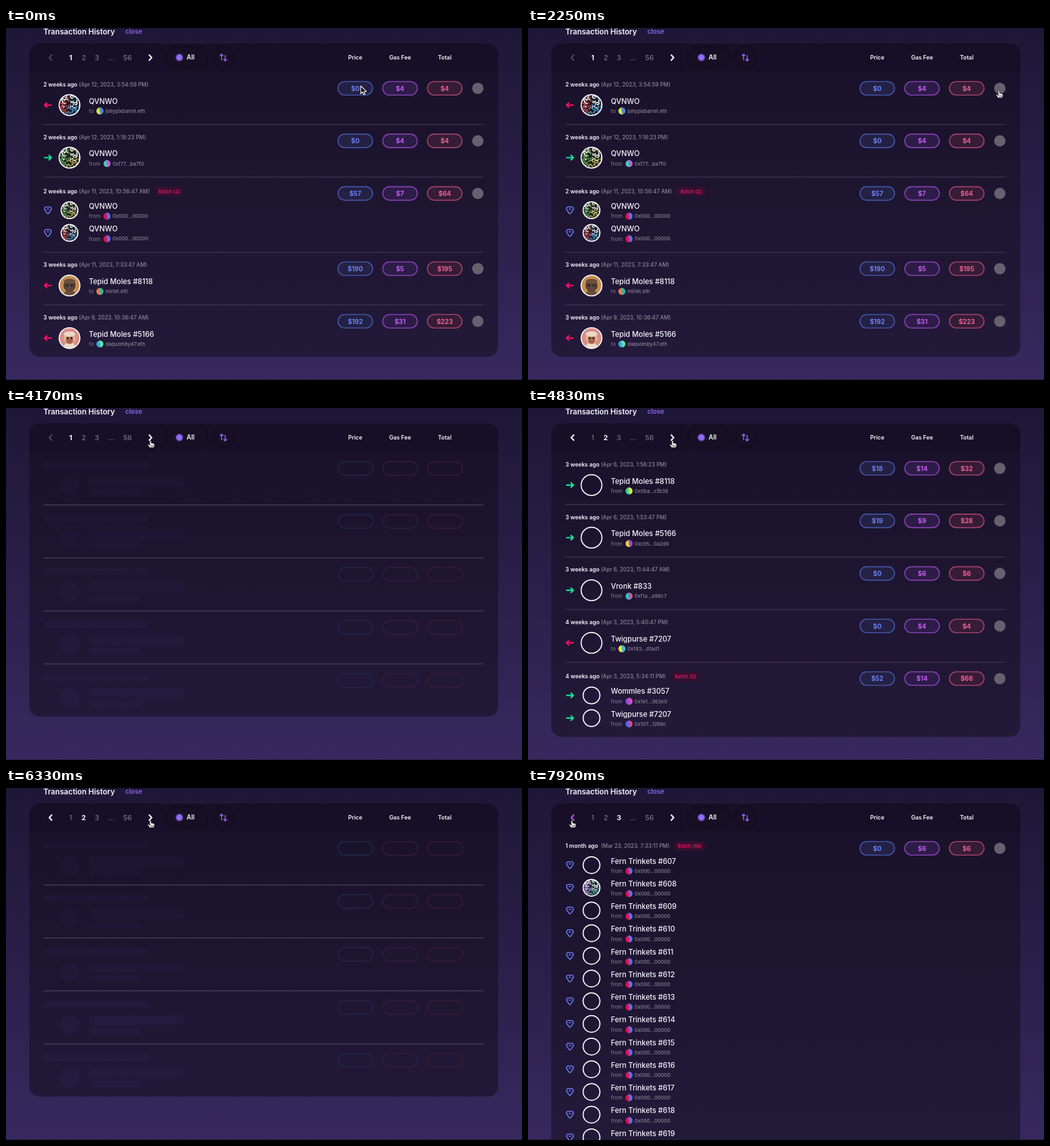
Write an HTML page with a canvas that moves like this. It is 800 by 547 pixels and loops after 8000 ms.

```html
<!DOCTYPE html>
<html lang="en">
<head>
<meta charset="utf-8">
<title>Transaction History</title>
<style>
html, body { margin: 0; width: 100%; height: 100%; overflow: hidden; background: #1f1738; }
canvas { display: block; width: 800px; height: 547px; }
</style>
</head>
<body>
<canvas id="stage" width="800" height="547"></canvas>
<script>
const ctx = document.getElementById('stage').getContext('2d');
const LOOP = 8000, FPS = 12, ROW = 81.7, ITEM = 35.25, FIRST = 93.7;
const WHITE = '#f6f4fc', GREY = '#8a8499', PURPLE = '#c153ea';
const COLUMNS = [
  { x: 541.5, label: 'Price', text: '#6c82f3', line: '#4354a4', fill: '#242144', ghost: '#23254a' },
  { x: 610.9, label: 'Gas Fee', text: '#c25ef3', line: '#8441b0', fill: '#2e1c48', ghost: '#321d40' },
  { x: 680.2, label: 'Total', text: '#f45f8e', line: '#9f4269', fill: '#361c37', ghost: '#3b1a35' }
];

// item: [direction, name, wallet, wallet colours, artwork, artwork load time]
const NONE = '0x000...00000', ZERO = ['#e3114f', '#5573f2'];
const PAGES = [
  [
    row('2 weeks ago', 'Apr 12, 2023, 3:54:59 PM', [0, 4, 4], [['out', 'QVNWO', 'jollypixbarrel.eth', ['#d4e34e', '#4a86d8'], 'red', 0]]),
    row('2 weeks ago', 'Apr 12, 2023, 1:18:23 PM', [0, 4, 4], [['in', 'QVNWO', '0xf77...ba7f0', ['#46c9b4', '#c659e0'], 'green', 0]]),
    row('2 weeks ago', 'Apr 11, 2023, 10:56:47 AM', [57, 7, 64], [
      ['mint', 'QVNWO', NONE, ZERO, 'green', 0],
      ['mint', 'QVNWO', NONE, ZERO, 'red', 0]], 230),
    row('3 weeks ago', 'Apr 11, 2023, 7:33:47 AM', [190, 5, 195], [['out', 'Tepid Moles #8118', 'mirlet.eth', ['#ef7847', '#2fb6a2'], 'brown', 0]]),
    row('3 weeks ago', 'Apr 9, 2023, 10:36:47 AM', [192, 31, 223], [['out', 'Tepid Moles #5166', 'daquomby47.eth', ['#32a9e8', '#5fe0a4'], 'pink', 0]])
  ],
  [
    row('3 weeks ago', 'Apr 6, 2023, 1:56:23 PM', [18, 14, 32], [['in', 'Tepid Moles #8118', '0x0ba...cfb38', ['#34d68c', '#e8e43c'], 'brown', 5050]]),
    row('3 weeks ago', 'Apr 6, 2023, 1:53:47 PM', [19, 9, 28], [['in', 'Tepid Moles #5166', '0xcb5...0a2d9', ['#edcf4a', '#9a46d8'], 'pink', 5050]]),
    row('3 weeks ago', 'Apr 6, 2023, 11:44:47 AM', [0, 6, 6], [['in', 'Vronk #833', '0xf1a...e96c7', ['#2bc2c5', '#d4568c']]]),
    row('4 weeks ago', 'Apr 3, 2023, 5:40:47 PM', [0, 4, 4], [['out', 'Twigpurse #7207', '0x183...d1ad1', ['#eee13e', '#35bde0']]]),
    row('4 weeks ago', 'Apr 3, 2023, 5:34:11 PM', [52, 14, 66], [
      ['in', 'Wommles #3057', '0x1e1...363e0', ['#8c4be8', '#dd4fb6']],
      ['in', 'Twigpurse #7207', '0x107...126bc', ['#4d6af0', '#e0447a']]], 221)
  ],
  [
    row('1 month ago', 'Mar 23, 2023, 7:33:11 PM', [0, 6, 6], Array.from({ length: 18 }, (_, i) =>
      ['mint', 'Fern Trinkets #' + (607 + i), NONE, ZERO, i === 1 ? 'violet' : null, 7740]), 226)
  ]
];

function row(age, date, prices, items, badgeX) {
  return { age, date, prices, items, badgeX };
}

function text(str, x, y, size, color, weight = 500, align = 'left') {
  ctx.font = `${weight} ${size}px Inter, sans-serif`;
  ctx.fillStyle = color;
  ctx.textAlign = align;
  ctx.fillText(str, x, y + size * 0.364);
}

function box(x, y, w, h, r, fill, stroke, width = 1.5) {
  ctx.beginPath();
  ctx.roundRect(x, y, w, h, r);
  if (fill) { ctx.fillStyle = fill; ctx.fill(); }
  if (stroke) { ctx.strokeStyle = stroke; ctx.lineWidth = width; ctx.stroke(); }
}

function disc(x, y, r, fill, stroke, width) {
  box(x - r, y - r, r * 2, r * 2, r, fill, stroke, width);
}

function lines(color, width, ...paths) {
  ctx.strokeStyle = color;
  ctx.lineWidth = width;
  ctx.lineCap = ctx.lineJoin = 'round';
  ctx.beginPath();
  for (const path of paths) path.forEach(([x, y], i) => i ? ctx.lineTo(x, y) : ctx.moveTo(x, y));
  ctx.stroke();
}

function gradient(y0, y1, ...colors) {
  const g = ctx.createLinearGradient(0, y0, 0, y1);
  colors.forEach((c, i) => g.addColorStop(i / (colors.length - 1), c));
  return g;
}

function random(seed) {
  return () => (seed = seed * 16807 % 2147483647) / 2147483647;
}

// Dabs on a sunflower spiral: mostly white above, coloured below.
function splatter(r, a, b) {
  const rnd = random(48271 * 7), count = 90;
  for (let i = 0; i < count; i++) {
    const d = r * Math.sqrt((i + 0.5) / count), turn = i * 2.39996;
    const x = d * Math.cos(turn), y = d * Math.sin(turn);
    const pick = rnd();
    if (pick < 0.3) continue;
    const white = pick < (y < 0 ? 0.78 : 0.45);
    ctx.fillStyle = white ? '#e9e8e2' : x + y * 0.4 < 0 ? a : b;
    ctx.beginPath();
    ctx.ellipse(x, y, r * (0.08 + rnd() * 0.08), r * 0.065, rnd() * 6, 0, 7);
    ctx.fill();
  }
}

function portrait(r, head, face, hat) {
  disc(0, r, r * 0.6, hat);
  disc(0, 0, r * 0.58, head);
  disc(0, r * 0.22, r * 0.34, face);
  ctx.beginPath();
  ctx.ellipse(0, -r * 0.4, r * 0.56, r * 0.24, 0, 0, 7);
  ctx.fillStyle = hat;
  ctx.fill();
  disc(-r * 0.2, 0, r * 0.11, '#2b2426');
  disc(r * 0.2, 0, r * 0.11, '#2b2426');
}

const ART = {
  red: ['#161a26', r => splatter(r, '#c9404c', '#4b93c4')],
  green: ['#182019', r => splatter(r, '#5a9a52', '#b9a858')],
  violet: ['#232a38', r => splatter(r, '#b585d8', '#54a8a0')],
  brown: ['#c58d52', r => portrait(r, '#4d3d34', '#5f493b', '#6b503c')],
  pink: ['#d98f88', r => portrait(r, '#dcb592', '#a9624c', '#ecd9c6')]
};

function avatar(x, y, r, kind) {
  if (kind) {
    const [back, paint] = ART[kind];
    ctx.save();
    ctx.translate(x, y);
    disc(0, 0, r, back);
    ctx.clip();
    paint(r);
    ctx.restore();
  }
  disc(x, y, r, null, '#fbfafd', 1.7);
}

function direction(kind, x, y) {
  if (kind === 'mint') {
    ctx.beginPath();
    ctx.moveTo(x - 4, y - 4.8);
    ctx.quadraticCurveTo(x, y - 6, x + 4, y - 4.8);
    ctx.quadraticCurveTo(x + 6.4, y - 3, x + 4.8, y - 0.5);
    ctx.lineTo(x + 1, y + 5);
    ctx.quadraticCurveTo(x, y + 6, x - 1, y + 5);
    ctx.lineTo(x - 4.8, y - 0.5);
    ctx.quadraticCurveTo(x - 6.4, y - 3, x - 4, y - 4.8);
    ctx.strokeStyle = '#6a7af2';
    ctx.lineWidth = 1.5;
    ctx.stroke();
    lines('#6a7af2', 1.5, [[x - 1.3, y - 1.8], [x + 1.3, y - 1.8]]);
    return;
  }
  const s = kind === 'in' ? 1 : -1;
  lines(s > 0 ? '#12e59c' : '#f50f62', 2.2,
    [[x - 5 * s, y], [x + 5 * s, y]],
    [[x + 1.8 * s, y - 3.4], [x + 5.3 * s, y], [x + 1.8 * s, y + 3.4]]);
}

function wallet(kind, address, [left, right], y) {
  const out = kind === 'out', x = out ? 145.5 : 156.6;
  text(out ? 'to' : 'from', 128.5, y, 8, '#777086');
  disc(x, y, 5.4, left);
  ctx.beginPath();
  ctx.arc(x, y, 5.4, -1.75, 1.4);
  ctx.fillStyle = right;
  ctx.fill();
  text(address, out ? 154.2 : 165.2, y, 7.7, '#8b8598');
}

function divider(y, color) {
  ctx.fillStyle = color;
  ctx.fillRect(58, y - 0.8, 682, 1.6);
}

function drawRows(rows, time) {
  let y = FIRST;
  rows.forEach((r, n) => {
    const batch = r.items.length > 1;
    const dateY = y - (batch ? 3.6 : 5.8);
    text(r.age, 58, dateY, 8.7, WHITE, 600);
    text(`(${r.date})`, 113, dateY, 8.35, GREY);
    if (batch) {
      const label = `Batch (${r.items.length})`, w = r.items.length > 9 ? 49 : 46;
      box(r.badgeX, y - 10.8, w, 15.2, 7.6, '#35102f');
      text(label, r.badgeX + w / 2, y - 3.2, 7.5, '#d8125a', 700, 'center');
    }
    COLUMNS.forEach((c, i) => {
      box(c.x - 26.8, y - 10.5, 53.6, 21, 10.5, c.fill, c.line, 1.6);
      text('$' + r.prices[i], c.x, y + 0.3, 9.8, c.text, 700, 'center');
    });
    disc(731.5, y, 8.8, '#67616f');
    r.items.forEach(([kind, name, address, colors, art, loadAt], i) => {
      const mid = y + 26.1 + i * ITEM;
      direction(kind, 65, mid);
      avatar(98.5, mid, batch ? 13 : 16.1, art && time >= loadAt ? art : null);
      text(name, 128.5, mid - 6.2, 11.25, WHITE);
      wallet(kind, address, colors, mid + 9.2);
    });
    y += ROW + (r.items.length - 1) * ITEM;
    if (n < rows.length - 1) divider(y - 25.5, '#382f4d');
  });
}

function drawSkeleton(alpha) {
  for (let i = 0; i < 5; i++) {
    const y = 94 + i * 82.3;
    const tone = `rgba(62,54,122,${(0.07 + i * 0.012) * alpha})`;
    box(58, y - 10, 163, 11, 5, tone);
    disc(98.5, y + 27, 15.5, tone);
    box(128.5, y + 12, 148, 16, 6, tone);
    box(128.5, y + 31, 82, 11, 5, tone);
    ctx.globalAlpha = alpha;
    for (const c of COLUMNS) box(c.x - 26.5, y - 10.5, 54, 21, 10.5, null, c.ghost);
    ctx.globalAlpha = 1;
    if (i < 4) divider(y + 56.7, '#423952');
  }
}

function chevron(x, side, color) {
  lines(color, 2.2, [[x - 1.9 * side, 42], [x + 1.9 * side, 46], [x - 1.9 * side, 50]]);
}

function drawHeader(page, prevColor, nextColor) {
  text('Transaction History', 58, 5.8, 11.7, WHITE, 600);
  text('close', 185, 5.8, 10.1, '#8a68f2', 600);
  ctx.save();
  ctx.shadowColor = 'rgba(8,4,18,.55)';
  ctx.shadowBlur = 9;
  box(250, 31, 62, 29, 14.5, '#171025');
  disc(337, 45.8, 14.5, '#171025');
  ctx.restore();
  chevron(69, -1, prevColor);
  chevron(224, 1, nextColor);
  [['1', 100.3], ['2', 120.5], ['3', 141], ['...', 163], ['56', 188.5]].forEach(([s, x], i) => {
    const on = i === page;
    text(s, x, 46, 10.9, on ? WHITE : '#777083', on ? 700 : 500, 'center');
  });
  disc(268.8, 45.8, 5.2, '#9269f7', '#5b419f', 1.4);
  text('All', 280, 45.8, 9.8, WHITE, 600);
  lines('#6e75f2', 1.5, [[334.3, 49.5], [334.3, 40.8]], [[332, 43], [334.3, 40.6], [336.6, 43]]);
  lines('#a05cf0', 1.5, [[339.8, 42.5], [339.8, 51]], [[337.5, 48.8], [339.8, 51.2], [342.1, 48.8]]);
  for (const c of COLUMNS) text(c.label, c.x, 45.6, 8.8, WHITE, 600, 'center');
}

function drawBackdrop(bottom) {
  ctx.fillStyle = gradient(0, 547, '#1f1737', '#2a1f49', '#37295f');
  ctx.fillRect(0, 0, 800, 547);
  ctx.fillStyle = '#211a38';
  ctx.fillRect(0, 546, 800, 1);
  box(36, 24, 727, bottom - 24, 16, gradient(24, 511, '#19112a', '#1e1531', '#231939'));
  box(36, 24, 727, 44, [16, 16, 0, 0], 'rgba(10,6,20,.14)');
}

const STOPS = [
  [80, 550, 90], [830, 705, 96.5], [1260, 705, 96.5], [1670, 730, 97], [2250, 730, 97], [2670, 551, 250],
  [2760, 551, 250], [3580, 224, 50], [6860, 224, 50], [7600, 68, 50]
];

function cursorAt(time) {
  const i = STOPS.findIndex(s => s[0] > time);
  if (i === 0) return STOPS[0].slice(1);
  if (i < 0) return STOPS.at(-1).slice(1);
  const [t0, x0, y0] = STOPS[i - 1], [t1, x1, y1] = STOPS[i];
  const p = (time - t0) / (t1 - t0), e = p * p * (3 - 2 * p);
  return [x0 + (x1 - x0) * e, y0 + (y1 - y0) * e];
}

function drawCursor(x, y, hand) {
  ctx.save();
  ctx.translate(x, y);
  ctx.lineJoin = 'round';
  const shape = new Path2D(hand
    ? 'M-1.2 1.2Q0 -.6 1.2 1.2V4.6Q2.5 3.8 3.3 5Q4.6 4.4 5.1 5.5Q6.4 5.1 6.3 7V8.6Q6 10 5.2 11.7H-1.3Q-2 10-4 8Q-5 6.4-3.4 6.3L-1.2 7.7Z'
    : 'M0 0V12L2.8 9.4L4.7 13.6L6.7 12.7L4.9 8.7H8.6Z');
  ctx.fillStyle = hand ? '#fff' : '#08070c';
  ctx.strokeStyle = hand ? '#08070c' : '#fff';
  ctx.lineWidth = hand ? 0.8 : 1.1;
  ctx.fill(shape);
  ctx.stroke(shape);
  if (hand) lines('#08070c', 0.7, [[0.8, 8], [0.8, 10]], [[2.6, 8], [2.6, 10]], [[4.3, 8], [4.3, 10]]);
  ctx.restore();
}

function render(clock) {
  const time = Math.floor((clock % LOOP + 4) * FPS / 1000) * 1000 / FPS;
  const page = time < 4800 ? 0 : time < 6800 ? 1 : 2;
  const loadStart = [3800, 5640, Infinity][page];
  const loading = time >= loadStart;
  const [x, y] = cursorAt(time);
  const overNext = y < 60 && Math.abs(x - 224) < 12;
  const overPrev = y < 60 && x < 80;
  const fresh = page > 0 && time < [0, 4880, 6880][page];

  drawBackdrop(loading ? 479.5 : page === 2 ? 720 : 511);
  if (loading) drawSkeleton(Math.min(1, 0.4 + (time - loadStart) / 300));
  else drawRows(PAGES[page], time);
  drawHeader(page,
    page === 0 ? '#4b4458' : overPrev ? PURPLE : WHITE,
    overNext && !loading && !fresh ? PURPLE : WHITE);
  drawCursor(x, y, overNext || overPrev || x > 699);
}

const start = performance.now();
function tick() {
  render(performance.now() - start);
  requestAnimationFrame(tick);
}
tick();
</script>
</body>
</html>
```
